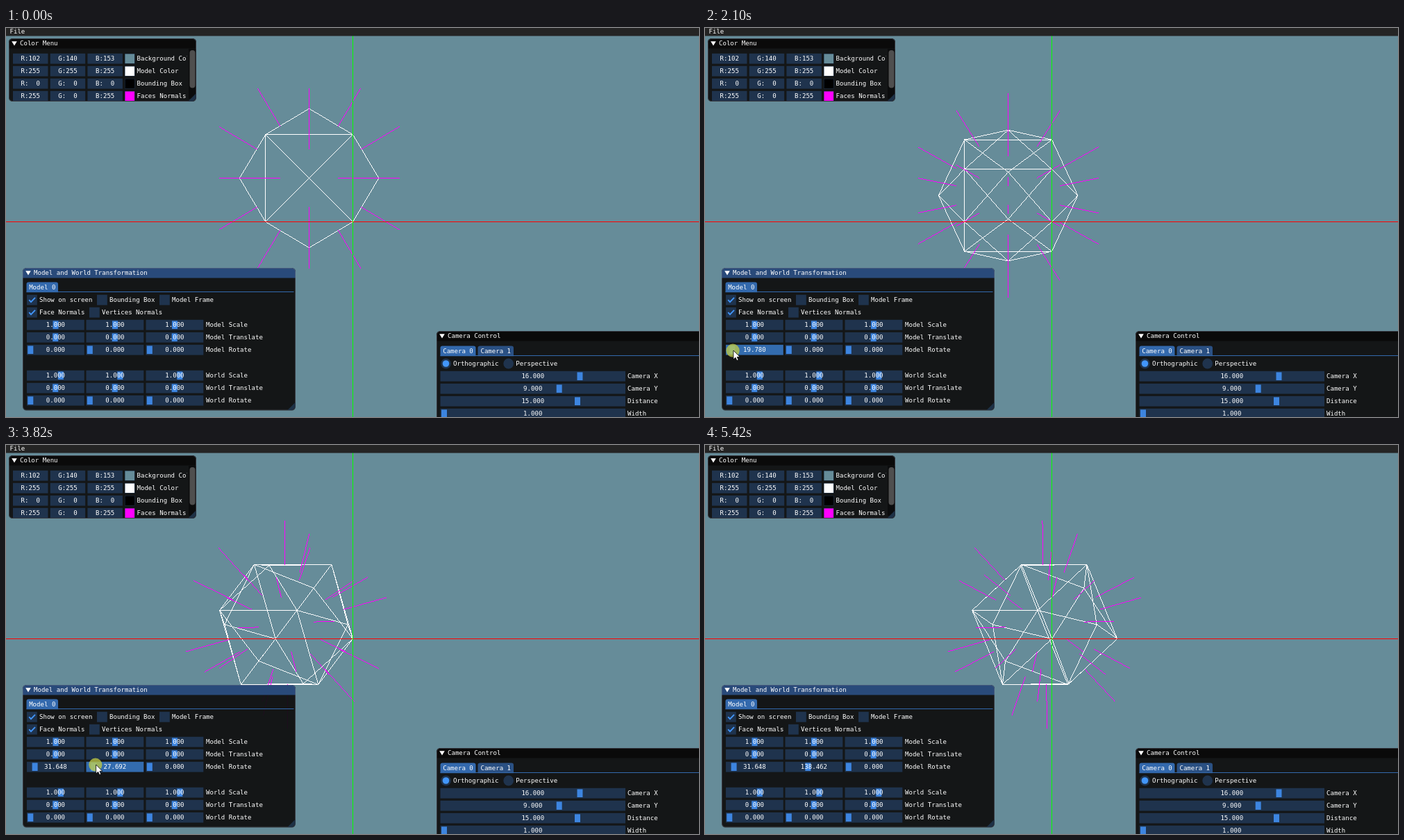
Write an HTML page with a canvas that moves like this. It is 998 px wide and 561 px high and loops after 6.08 s.

```html
<!DOCTYPE html>
<html lang="en">
<head>
<meta charset="utf-8">
<title>Wireframe viewer</title>
<style>
  html, body { margin: 0; width: 100%; height: 100%; overflow: hidden; background: #668c99; }
  canvas { display: block; width: 100vw; height: 100vh; }
</style>
</head>
<body>
<canvas id="stage" width="998" height="561"></canvas>
<script>
const ctx = document.getElementById('stage').getContext('2d');
const W = 998, H = 561, LOOP = 6080;

const C = {
  scene: '#668c99', menu: '#242424', window: 'rgba(15,15,15,.94)', border: 'rgba(110,110,128,.5)',
  title: '#0a0a0a', titleActive: '#294a7a', frame: '#1f334d', hover: '#264a72', active: '#336caf',
  grab: '#3d85e0', bright: '#4296fa', tab: '#3369ad', tabIdle: '#2a5083', grip: '#1e3146',
  normal: '#ff00ff', axisX: '#ff0000', axisY: '#00ff00'
};

// Bursts of motion: first step, last step, number of steps.
const BURSTS = [
  [130, 680, 9], [750, 1230, 8], [1430, 1430, 1], [1690, 2230, 9], [2300, 2850, 7],
  [2920, 3400, 7], [3540, 4100, 9], [4170, 4450, 5], [4710, 5260, 9], [5330, 5420, 2]
];

// Sliders advance in whole mouse pixels: time, steps.
const STEP = 360 / 91;
const TURN_X = [[1690, 0], [2100, 5], [2230, 7], [2300, 8]];
const TURN_Y = [[3540, 0], [4170, 16], [4450, 21], [4640, 21], [4840, 26], [5260, 35]];

// Pointer: time, x, y.
const POINTER = [
  [680, 58, 486], [1230, 35.6, 464.6], [1690, 36.3, 464.6], [2100, 41, 465], [2300, 43.5, 464.5],
  [2480, 44, 464], [2850, 146, 460], [3190, 127, 460.5], [3400, 124.5, 460.5], [3540, 125.3, 461],
  [4170, 135, 461], [4450, 139, 461], [4640, 139.5, 461], [4840, 144.7, 461], [5260, 152, 461.5]
];

function snap(t) {
  let held = 0;
  for (const [a, b, n] of BURSTS) {
    if (t < a) break;
    const gap = n > 1 ? (b - a) / (n - 1) : 1;
    held = a + gap * Math.min(n - 1, Math.floor((t - a + 8) / gap));
  }
  return held;
}

function track(keys, t, k = 1) {
  if (t <= keys[0][0]) return keys[0][k];
  for (let i = 1; i < keys.length; i++) {
    const a = keys[i - 1], b = keys[i];
    if (t <= b[0]) return a[k] + (b[k] - a[k]) * (t - a[0]) / (b[0] - a[0]);
  }
  return keys[keys.length - 1][k];
}

function pointerAt(t) {
  if (t < 130 || t >= 5415) return null;
  if (t >= 5325) return [663, 506];
  if (t < 680) {
    const left = (1 - (t - 130) / 550) ** 2;
    return [58 + 740 * left, 486 + 69 * left];
  }
  return [track(POINTER, t, 1), track(POINTER, t, 2)];
}

// ---- scene ----

const UNIT = 125.8, OX = 499, OY = 279, PEAK = 0.297;

// One hard pixel per step along the longer side, the same from either end.
function line(a, b) {
  const k = Math.abs(b[0] - a[0]) >= Math.abs(b[1] - a[1]) ? 0 : 1;
  if (a[k] > b[k]) [a, b] = [b, a];
  const slope = (b[1 - k] - a[1 - k]) / (b[k] - a[k] || 1);
  for (let u = Math.round(a[k]); u <= Math.round(b[k]); u++) {
    const v = Math.round(a[1 - k] + slope * (u - a[k]));
    ctx.fillRect(k ? v : u, k ? u : v, 1, 1);
  }
}

function projector(ax, ay) {
  const [cx, sx, cy, sy] = [Math.cos(ax), Math.sin(ax), Math.cos(ay), Math.sin(ay)];
  return ([px, py, pz]) => {
    const x = px - 0.5, y = py + 0.5, z = pz + 0.5;
    const depth = y * sx + z * cx;
    return [OX + UNIT * (x * cy - depth * sy), OY - UNIT * (y * cx - z * sx)];
  };
}

const point = (i, a, j, b, c = 0) => {
  const p = [c, c, c];
  p[i] = a;
  p[j] = b;
  return p;
};

// A cube with a low pyramid on every side.
function drawModel(ax, ay) {
  const project = projector(ax, ay);
  const edge = (a, b) => line(project(a), project(b));
  const len = Math.hypot(0.5, PEAK);
  const normals = [];
  ctx.fillStyle = '#fff';
  for (let i = 0; i < 3; i++) for (const s of [-1, 1]) {
    const peak = point(i, s * (0.5 + PEAK), (i + 1) % 3, 0);
    for (const j of [(i + 1) % 3, (i + 2) % 3]) for (const q of [-1, 1]) {
      const a = point(i, s / 2, j, q / 2, 0.5), b = point(i, s / 2, j, q / 2, -0.5);
      edge(a, b);
      edge(a, peak);
      edge(b, peak);
      const u = (1.5 + PEAK) / 3, v = 1 / 3;
      normals.push([point(i, s * u, j, q * v),
        point(i, s * (u + 0.25 / len), j, q * (v + PEAK / 2 / len))]);
    }
  }
  ctx.fillStyle = C.normal;
  for (const [a, b] of normals) edge(a, b);
}

function drawScene(ax, ay) {
  box(0, 0, W, H, C.scene);
  drawModel(ax, ay);
  box(0, OY, W, 1, C.axisX);
  box(OX, 0, 1, H, C.axisY);
}

// ---- widgets ----

function box(x, y, w, h, color) {
  ctx.fillStyle = color;
  ctx.fillRect(x, y, w, h);
}

function text(str, x, y, align = 'left') {
  ctx.textAlign = align;
  ctx.fillStyle = '#fff';
  ctx.fillText(str, x, y + 3.2);
}

function poly(points, color) {
  ctx.beginPath();
  for (const [x, y] of points) ctx.lineTo(x, y);
  ctx.closePath();
  ctx.fillStyle = color;
  ctx.fill();
}

function round(x, y, w, h, r, color) {
  ctx.beginPath();
  ctx.roundRect(x, y, w, h, r);
  ctx.fillStyle = color;
  ctx.fill();
}

function disc(x, y, r, color) {
  ctx.beginPath();
  ctx.arc(x, y, r, 0, Math.PI * 2);
  ctx.fillStyle = color;
  ctx.fill();
}

function panel(x, y, w, h, name, focused) {
  round(x, y, w, h, 5.5, C.window);
  round(x, y, w, 14.5, [5.5, 5.5, 0, 0], focused ? C.titleActive : C.title);
  ctx.beginPath();
  ctx.roundRect(x + 0.5, y + 0.5, w - 1, h - 1, 5);
  ctx.strokeStyle = C.border;
  ctx.lineWidth = 0.8;
  ctx.stroke();
  poly([[x + 4.2, y + 4.2], [x + 11.8, y + 4.2], [x + 8, y + 10.6]], '#fff');
  text(name, x + 16, y + 7.2);
}

function grip(x, y) {
  poly([[x, y - 11], [x, y - 4], [x - 4, y], [x - 11, y]], C.grip);
}

function field(x, y, w, label, color = C.frame) {
  box(x, y - 7.2, w, 14.8, color);
  return () => text(label, x + w / 2, y, 'center');
}

function slider(x, y, w, label, grabX, state = '') {
  const write = field(x, y, w, label, C[state || 'frame']);
  box(grabX - 4, y - 5.6, 8, 11.6, state === 'active' ? C.bright : C.grab);
  write();
}

function check(x, y, label, on) {
  box(x, y - 7.2, 14.8, 14.8, C.frame);
  if (on) {
    ctx.beginPath();
    ctx.moveTo(x + 3.2, y + 0.2);
    ctx.lineTo(x + 6, y + 3.2);
    ctx.lineTo(x + 12, y - 3.2);
    ctx.strokeStyle = C.bright;
    ctx.lineWidth = 1.9;
    ctx.stroke();
  }
  text(label, x + 18, y);
}

function radio(x, y, label, on) {
  disc(x, y, 7.4, C.frame);
  if (on) disc(x, y, 4.8, C.bright);
  text(label, x + 10.5, y);
}

function tab(x, y, w, label, on) {
  round(x, y, w, 14.8, [3, 3, 0, 0], on ? C.tab : C.tabIdle);
  text(label, x + w / 2, y + 7.6, 'center');
}

// ---- windows ----

function drawColors() {
  panel(4, 15, 270, 91, 'Color Menu');
  const rows = [
    ['Background Color', 102, 140, 153], ['Model Color', 255, 255, 255],
    ['Bounding Box', 0, 0, 0], ['Faces Normals', 255, 0, 255]
  ];
  ctx.save();
  ctx.beginPath();
  ctx.rect(5, 30, 255.5, 75);
  ctx.clip();
  rows.forEach(([name, ...rgb], i) => {
    const y = 44 + i * 18;
    rgb.forEach((v, k) => {
      field(10 + k * 53.7, y, 50.5, 'RGB'[k] + ':' + String(v).padStart(3))();
    });
    box(171, y - 7, 14.5, 14.5, C.frame);
    box(171.5, y - 6.5, 13.5, 13.5, `rgb(${rgb})`);
    text(name, 188.5, y);
  });
  ctx.restore();
  box(263, 30, 10.5, 72, 'rgba(5,5,5,.53)');
  round(264.5, 32, 8, 54.5, 4, '#4f4f4f');
  grip(273.5, 105.5);
}

const COLUMNS = [30, 115.5, 201.5];

function drawTransforms(turnX, turnY, states) {
  panel(24, 346, 393, 205.5, 'Model and World Transformation', true);
  tab(29.5, 366.5, 45.5, 'Model 0', true);
  box(29.5, 380, 385, 1, C.tab);
  check(30, 392, 'Show on screen', true);
  check(131, 392, 'Bounding Box', false);
  check(221, 392, 'Model Frame', false);
  check(30, 410, 'Face Normals', true);
  check(120, 410, 'Vertices Normals', false);

  const row = (y, name, value, offset) => {
    COLUMNS.forEach(x => slider(x, y, 82.8, value, x + offset));
    text(name, 288, y);
  };
  row(428, 'Model Scale', '1.000', 41.5);
  row(446, 'Model Translate', '0.000', 41.2);
  [turnX, turnY, 0].forEach((deg, i) => {
    const x = COLUMNS[i];
    slider(x, 464, 82.8, deg.toFixed(3), x + 5.3 + deg / 360 * 71.6, states[i]);
  });
  text('Model Rotate', 288, 464);
  row(501, 'World Scale', '1.000', 48.8);
  row(519, 'World Translate', '0.000', 41.2);
  row(537, 'World Rotate', '0.000', 5.3);
  grip(416.5, 551);
}

function drawCamera() {
  panel(620, 437, 420, 160, 'Camera Control');
  tab(625.5, 458.5, 51, 'Camera 0', true);
  tab(679.5, 458.5, 51.5, 'Camera 1', false);
  box(625.5, 472, 380, 1, C.tab);
  radio(633.5, 484, 'Orthographic', true);
  radio(723.7, 484, 'Perspective', false);
  const rows = [
    ['Camera X', '16.000', 826.5], ['Camera Y', '9.000', 796.7],
    ['Distance', '15.000', 823], ['Width', '1.000', 631]
  ];
  rows.forEach(([name, value, grabX], i) => {
    const y = 502 + i * 18;
    slider(625.5, y, 266.5, value, grabX);
    text(name, 895, y);
  });
}

function drawPointer([x, y], pressed) {
  if (pressed) disc(x - 0.8, y + 0.2, 9.6, 'rgba(190,200,70,.78)');
  ctx.save();
  ctx.translate(x, y);
  poly([[0, 0], [0, 13], [3, 10.3], [5, 14.6], [7.2, 13.7], [5.3, 9.5], [9.3, 9.5]], '#fff');
  ctx.strokeStyle = '#000';
  ctx.lineWidth = 0.8;
  ctx.stroke();
  ctx.restore();
}

function sliderStates(t, tip, pressed) {
  return COLUMNS.map((x, i) => {
    if (pressed) return i === (t < 3000 ? 0 : 1) ? 'active' : '';
    const over = tip && t > 1430 && tip[0] >= x && tip[0] <= x + 82.8 && Math.abs(tip[1] - 464) < 7.5;
    return over ? 'hover' : '';
  });
}

function draw(time) {
  const t = snap(time);
  const turnX = Math.round(track(TURN_X, t)) * STEP;
  const turnY = Math.round(track(TURN_Y, t)) * STEP;
  const tip = pointerAt(t);
  const pressed = (t >= 1430 && t < 2480) || (t >= 3540 && t < 5325);
  const rad = Math.PI / 180;

  ctx.font = '9.07px "DejaVu Sans Mono", monospace';
  drawScene(turnX * rad, turnY * rad);
  box(0, 0, W, 11.5, C.menu);
  text('File', 5.5, 5);
  drawColors();
  drawCamera();
  drawTransforms(turnX, turnY, sliderStates(t, tip, pressed));
  if (tip) drawPointer(tip, pressed);
}

const start = performance.now();
function tick() {
  draw((performance.now() - start) % LOOP);
  requestAnimationFrame(tick);
}
tick();
</script>
</body>
</html>
```
